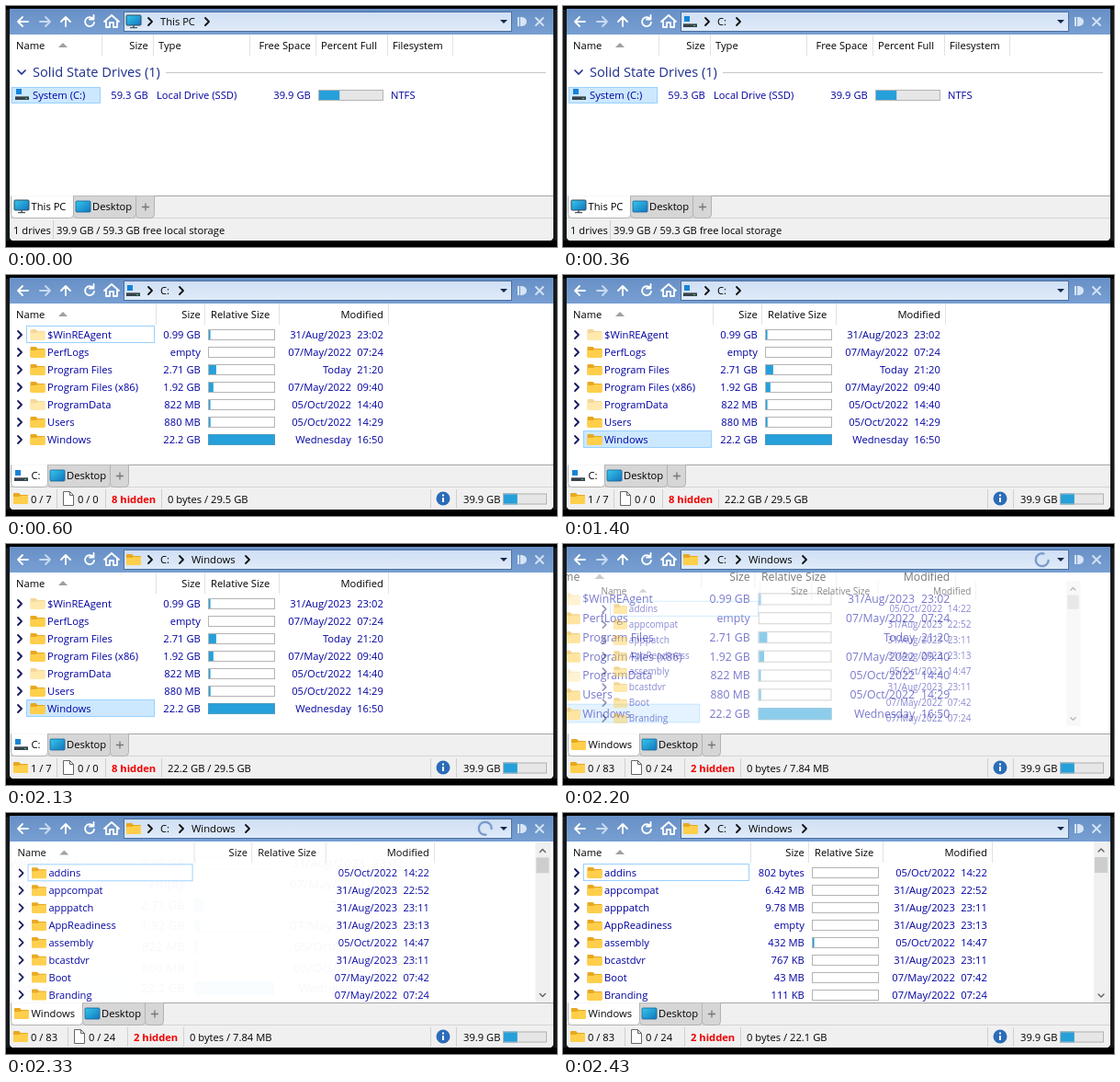
Write an HTML page that moves like this. It is 600 by 262 pixels and loops after 3.7 s.

```html
<!DOCTYPE html>
<html lang="en">
<head>
<meta charset="utf-8">
<title>File browser</title>
<style>
  html, body { margin: 0; width: 100%; height: 100%; overflow: hidden; background: #000; }
  svg { display: block; width: 100vw; height: 100vh; }
  text { font: 11.2px "Open Sans", "Noto Sans", sans-serif; fill: #000; }
  .navy { fill: #0000a0; }
  .bold { font-weight: 700; fill: #f00000; }
  .group { font-size: 14.6px; fill: #1e2f8c; }
  .line { fill: none; stroke-linecap: round; stroke-linejoin: round; }
  .page { transform-origin: 298px 119px; }
  .spin { transform-origin: 522px 17px; }
</style>
</head>
<body>
<script>
const LOOP = 3700;
const BLUE = '#26a0da';
let css = '', count = 0;

// Registers keyframes from [ms, declarations] stops and returns a style attribute.
function animate(stops, easing) {
  const name = 'k' + count++;
  const frames = stops.map(([ms, rule]) => `${(ms / LOOP * 100).toFixed(4)}%{${rule}}`);
  css += `@keyframes ${name}{${frames.join('')}}`;
  return `style="animation:${name} ${LOOP}ms ${easing} infinite"`;
}

function show(from, to, content) {
  const stops = [[0, `visibility:${from ? 'hidden' : 'visible'}`]];
  if (from) stops.push([from, 'visibility:visible']);
  if (to < LOOP) stops.push([to, 'visibility:hidden']);
  stops.push([LOOP, `visibility:${to < LOOP ? 'hidden' : 'visible'}`]);
  return `<g ${animate(stops, 'step-end')}>${content}</g>`;
}

// A page grows into place over the interval "enter" and grows away over "leave".
function page(enter, leave, content) {
  const before = 'transform:scale(.8);opacity:0';
  const open = 'transform:scale(1);opacity:1';
  const after = 'transform:scale(1.2);opacity:0';
  const stops = [
    ...(enter ? [[0, before], [enter[0], before], [enter[1], open]] : [[0, open]]),
    ...(leave ? [[leave[0], open], [leave[1], after], [LOOP, after]] : [[LOOP, open]])
  ];
  return `<g class="page" ${animate(stops, 'cubic-bezier(.215,.61,.355,1)')}>${content}</g>`;
}

const rect = (x, y, w, h, fill, stroke = 'none') =>
  `<rect x="${x}" y="${y}" width="${w}" height="${h}" fill="${fill}" stroke="${stroke}"/>`;
const box = (x, y, w, h, fill) => rect(x + .5, y + .5, w - 1, h - 1, fill, '#99d1ff');
const path = (d, fill) => `<path d="${d}" fill="${fill}"/>`;
const line = (d, color, width = 1) =>
  `<path class="line" d="${d}" stroke="${color}" stroke-width="${width}"/>`;
const text = (x, y, s, cls = '', anchor = 'start') =>
  `<text x="${x}" y="${y + 4}" class="${cls}" text-anchor="${anchor}">${s}</text>`;
const right = (x, y, s, cls) => text(x + .8, y, s, cls, 'end');
const at = (x, y, content) => `<g transform="translate(${x} ${y})">${content}</g>`;
const chevron = (x, y, color = '#17175e') => line(`M${x - 2} ${y - 4}l4 4-4 4`, color, 1.8);

// Icons are 16 pixels wide and centred vertically on y.
const folder = (x, y, opacity = 1) => at(x, y, `<g opacity="${opacity}">` +
  path('M0-5q0-1 1-1h5l2 2h7q1 0 1 1v8H0z', '#e8a820') +
  path('M0-2h6l2-1h8v8q0 1-1 1H1q-1 0-1-1z', '#ffcf4b') + '</g>');
const drive = (x, y) => at(x, y,
  rect(1, -6, 6, 6, '#1683d8') + rect(0, 2, 15, 4, '#38424c') +
  rect(0, 2, 15, 1, '#727d87') + rect(11, 4, 2, 1, '#42d36b'));
const screen = (x, y) => at(x, y,
  `<rect y="-6" width="16" height="12" rx="1" fill="url(#glass)" stroke="#12629b" stroke-width=".8"/>`);
const monitor = (x, y) => at(x, y,
  `<rect y="-7" width="16" height="11" rx="1" fill="url(#glass)" stroke="#344c5e"/>` +
  rect(7, 4, 2, 2, '#66727c') + rect(4, 6, 8, 1.2, '#46525c'));
const sheet = (x, y) => at(x, y,
  `<path d="M.5-7.5h7l4 4v11H.5zM7.5-7.5v4h4" fill="#fff" stroke="#666"/>`);

function bar(x, y, w, ratio, back = '#fff') {
  return rect(x, y - 6, w, 12, back) + rect(x, y - 6, w * ratio, 12, BLUE) +
    rect(x + .5, y - 5.5, w - 1, 11, 'none', ratio === 1 ? '#4b9cc4' : '#b4b4b4');
}

// Pages
const header = (separators, labels) =>
  separators.map(x => rect(x, 31, 1, 23, '#e2e2e2')).join('') +
  text(11, 43, 'Name') + path('M57 45l5-5 5 5z', '#a0a0a0') + labels;

const drives = header([104, 160, 265, 337, 415, 486],
    right(154, 43, 'Size') + text(166, 43, 'Type') + right(331, 43, 'Free Space') +
    text(343, 43, 'Percent Full') + text(421, 43, 'Filesystem')) +
  line('M13 70l4 4 4-4', '#1e2f8c', 1.7) + text(29, 73, 'Solid State Drives (1)', 'group') +
  rect(174, 72, 414, 1, '#c6c6ce') +
  box(6, 88, 97, 18, '#cce8ff') + drive(10, 96) + text(29, 97, 'System (C:)', 'navy') +
  right(154, 97, '59.3 GB', 'navy') + text(164, 97, 'Local Drive (SSD)', 'navy') +
  right(331, 97, '39.9 GB', 'navy') + bar(340, 97, 71, .327, '#e6e6e6') + text(419, 97, 'NTFS', 'navy');

const rowY = i => 65 + 19 * i;

// "name" is the right end of the name column and "edge" that of the size column.
const folderHeader = (name, edge) => header([name + 1, edge + 5, edge + 86, edge + 205],
  right(edge, 43, 'Size') + text(edge + 12, 43, 'Relative Size') + right(edge + 199, 43, 'Modified'));

const folderRows = (edge, rows) => rows.map(([name, , , date, time, faded], i) => {
  const y = rowY(i);
  return chevron(15, y) + folder(26.5, y, faded ? .45 : 1) + text(45, y, name, 'navy') +
    right(edge + 164, y, date, 'navy') + right(edge + 199, y, time, 'navy');
}).join('');

const folderSizes = (edge, rows) => rows.map(([, size, ratio], i) =>
  right(edge, rowY(i), size, 'navy') + bar(edge + 9, rowY(i), 73, ratio)).join('');

const rootRows = [
  ['$WinREAgent', '0.99 GB', .035, '31/Aug/2023', '23:02', true],
  ['PerfLogs', 'empty', 0, '07/May/2022', '07:24'],
  ['Program Files', '2.71 GB', .122, 'Today', '21:20'],
  ['Program Files (x86)', '1.92 GB', .08, '07/May/2022', '09:40'],
  ['ProgramData', '822 MB', .035, '05/Oct/2022', '14:40', true],
  ['Users', '880 MB', .037, '05/Oct/2022', '14:29'],
  ['Windows', '22.2 GB', 1, 'Wednesday', '16:50']
];
const systemRows = [
  ['addins', '802 bytes', 0, '05/Oct/2022', '14:22'],
  ['appcompat', '6.42 MB', 0, '31/Aug/2023', '22:52'],
  ['apppatch', '9.78 MB', 0, '31/Aug/2023', '23:11'],
  ['AppReadiness', 'empty', 0, '31/Aug/2023', '23:13'],
  ['assembly', '432 MB', .035, '05/Oct/2022', '14:47'],
  ['bcastdvr', '767 KB', 0, '31/Aug/2023', '23:11'],
  ['Boot', '43 MB', 0, '07/May/2022', '07:42'],
  ['Branding', '111 KB', 0, '07/May/2022', '07:24']
];

const root = folderHeader(162, 211) +
  show(0, 1400, box(22, 55, 140, 19, 'none')) +
  show(1400, LOOP, box(22, 169, 140, 19, '#cce8ff')) +
  folderRows(211, rootRows) + folderSizes(211, rootRows);

const scrollbar = rect(578, 31, 17, 176, '#f0f0f0') + rect(579, 48, 14, 17, '#cdcdcd') +
  line('M583 42l3-3 3 3M583 197l3 3 3-3', '#606060', 1.4);

const system = folderHeader(203, 262) + box(22, 55, 181, 19, 'none') +
  folderRows(262, systemRows) + show(2430, LOOP, folderSizes(262, systemRows)) + scrollbar;

// Address bar
const crumbs = (icon, parts) => icon(131, 17) + chevron(157, 17, '#111') +
  parts.map(([x, label, end]) => text(x, 17, label) + chevron(end, 17, '#111')).join('');

const toolbar = rect(4, 3, 592, 28, 'url(#bar)') +
  line('M24 17H13m5-5l-5 5 5 5M65 22V12m-5 5l5-5 5 5M109 16v7h4v-5h4v5h4v-7M107 17l8-7 8 7', '#fff', 1.8) +
  line('M37 17h11m-5-5l5 5-5 5', '#c9daf0', 1.8) +
  line('M95 14a5 5 0 1 0 1 4M95.5 10v4.5H91', '#fff', 1.8) +
  rect(128.5, 6.5, 422, 21, 'url(#field)', '#4c6f9f') + path('M538 15h8l-4 4z', '#16284a') +
  rect(557, 12, 2, 10, '#d6e4f5') + path('M560 12h2q5 1 5 5t-5 5h-2z', '#d6e4f5') +
  line('M577 13l8 8m0-8l-8 8', '#d6e4f5', 1.8);

// Tabs
const tabShape = (x, w, fill) =>
  `<path d="M${x + .5} 206.5v20q0 4 4 4h${w - 8}q4 0 4-4v-20" fill="${fill}" stroke="#b2b2b2"/>`;

function tabs(icon, label, w) {
  const x = 5 + w;
  return rect(x, 206, 591 - w, 1, '#a6a6a6') + tabShape(x, 68, '#d6d6d6') + tabShape(x + 68, 20, '#d6d6d6') +
    tabShape(5, w, '#fff') + icon(9, 218) + text(27.5, 218, label) +
    screen(x + 3, 218) + text(x + 21, 218, 'Desktop') +
    line(`M${x + 75.5} 218.5h7m-3.5-3.5v7`, '#777', 1.3);
}

// Status bar
const divider = x => rect(x, 233, 1, 21, '#d0d0d0');
const statusRight = divider(462) + '<circle cx="476" cy="243" r="7.5" fill="#2b6cb8"/>' +
  rect(475, 242, 2, 5, '#fff') + rect(475, 238.5, 2, 2, '#fff') +
  divider(490) + text(498, 244, '39.9 GB') + bar(541, 243.5, 48, .33, '#e6e6e6');

// "digits" is the width that the longer numbers add to each of the two counters.
const status = (digits, folders, files, hidden, total) =>
  folder(8, 243) + text(27, 244, folders) +
  at(digits, 0, divider(55) + sheet(62, 243) + text(78, 244, files)) +
  at(2 * digits, 0, divider(108) + text(115, 244, hidden, 'bold') + divider(169) + text(176, 244, total)) +
  statusRight;

const OPEN_ROOT = 378, ROOT_READY = 600;
const OPEN_SYSTEM = 2158, SYSTEM_READY = 2395;

const turn = animate([[0, 'transform:rotate(-60deg)'], [2160, 'transform:rotate(-60deg)'],
  [2430, 'transform:rotate(102deg)'], [LOOP, 'transform:rotate(102deg)']], 'linear');
const spinner = `<g class="spin" ${turn}>${line('M527 12.5a7 7 0 1 0 0 9', '#6d8fc4', 2)}</g>`;

const scene = `
<defs>
  <linearGradient id="bar" x2="0" y2="1"><stop stop-color="#6890c6"/><stop offset="1" stop-color="#779fd2"/></linearGradient>
  <linearGradient id="field" x2="0" y2="1"><stop stop-color="#cfdff4"/><stop offset="1" stop-color="#e0ebf9"/></linearGradient>
  <linearGradient id="glass" x2="1" y2="1"><stop stop-color="#35c8ed"/><stop offset="1" stop-color="#1275bd"/></linearGradient>
  <clipPath id="window"><path d="M4 3H596V250q0 5-5 5H9q-5 0-5-5z"/></clipPath>
  <clipPath id="list"><rect x="4" y="31" width="592" height="175"/></clipPath>
</defs>` +
  rect(0, 0, 600, 262, '#000') + rect(0, 4, 600, 251, '#15191b') +
  '<g clip-path="url(#window)">' + rect(4, 3, 592, 252, '#fff') + toolbar +
  show(0, 300, crumbs(monitor, [[168, 'This PC', 219]])) +
  show(300, 2130, crumbs(drive, [[168, 'C:', 191]])) +
  show(2130, LOOP, crumbs(folder, [[168, 'C:', 191], [202, 'Windows', 263]])) +
  show(2160, 2430, spinner) +
  '<g clip-path="url(#list)">' +
  page(null, [OPEN_ROOT, ROOT_READY], drives) +
  page([OPEN_ROOT, ROOT_READY], [OPEN_SYSTEM, SYSTEM_READY], root) +
  page([OPEN_SYSTEM, SYSTEM_READY], null, system) + '</g>' +
  rect(4, 206, 592, 49, '#f0f0f0') + rect(4, 230, 592, 1, '#d4d4d4') +
  show(0, OPEN_ROOT, tabs(monitor, 'This PC', 68) +
    text(8, 244, '1 drives') + divider(51) + text(55, 244, '39.9 GB / 59.3 GB free local storage')) +
  show(OPEN_ROOT, OPEN_SYSTEM, tabs(drive, 'C:', 40)) +
  show(OPEN_ROOT, 1400, status(0, '0 / 7', '0 / 0', '8 hidden', '0 bytes / 29.5 GB')) +
  show(1400, OPEN_SYSTEM, status(0, '1 / 7', '0 / 0', '8 hidden', '22.2 GB / 29.5 GB')) +
  show(OPEN_SYSTEM, LOOP, tabs(folder, 'Windows', 78)) +
  show(OPEN_SYSTEM, 2430, status(12, '0 / 83', '0 / 24', '2 hidden', '0 bytes / 7.84 MB')) +
  show(2430, LOOP, status(12, '0 / 83', '0 / 24', '2 hidden', '0 bytes / 22.1 GB')) +
  '</g>';

document.head.insertAdjacentHTML('beforeend', `<style>${css}</style>`);
document.body.innerHTML = `<svg viewBox="0 0 600 262">${scene}</svg>`;
</script>
</body>
</html>
```
